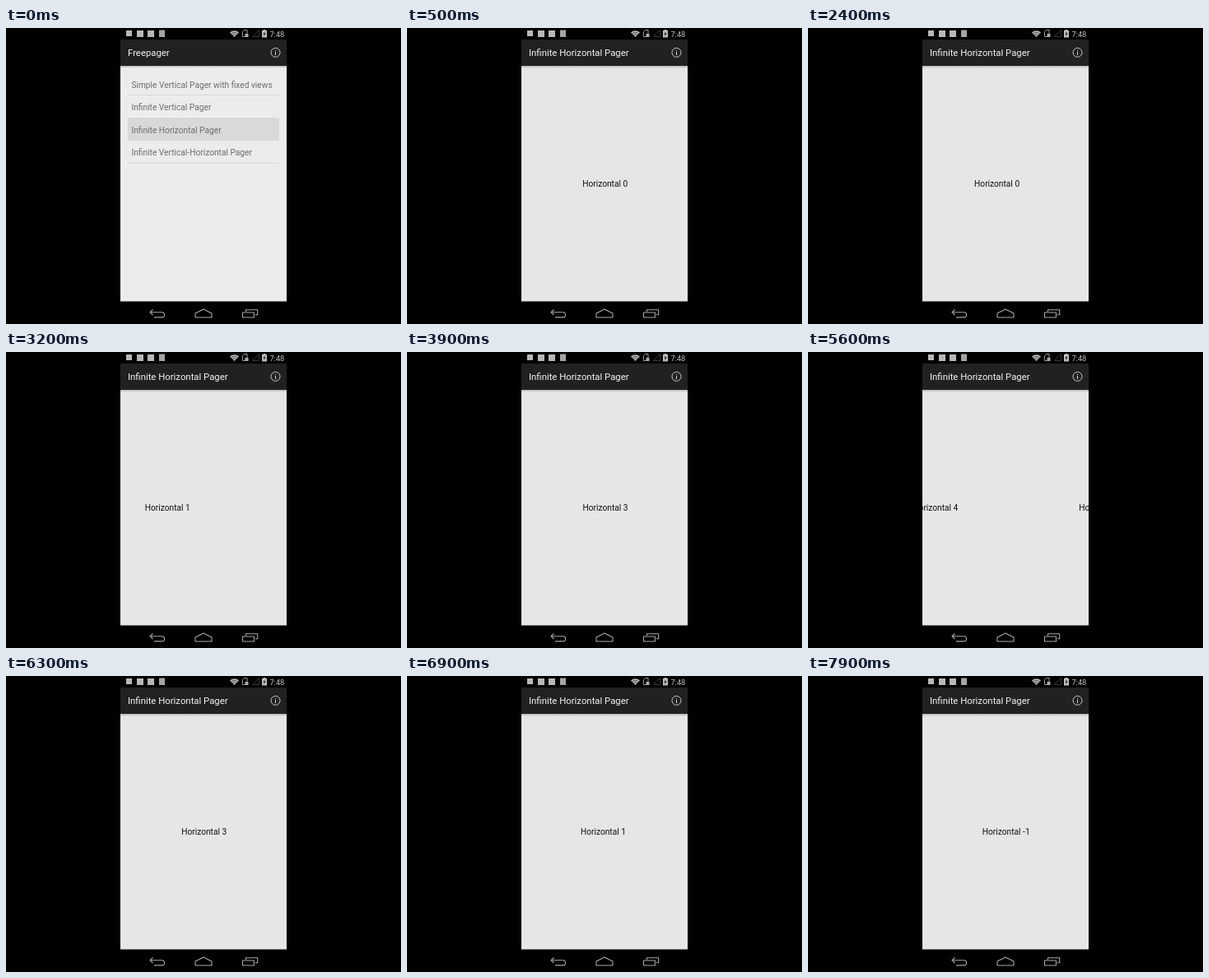
These frames come from a looping animation (480x360 px, 8 s). An HTML page with a canvas:

```html
<!DOCTYPE html>
<html lang="en">
<head>
<meta charset="utf-8">
<title>Freepager</title>
<style>
html, body { margin: 0; width: 100%; height: 100%; overflow: hidden; background: #000; }
canvas { display: block; width: 480px; height: 360px; }
</style>
</head>
<body>
<canvas id="stage" width="480" height="360"></canvas>
<script>
const ctx = document.getElementById('stage').getContext('2d');
const LOOP = 8000, STEP = 100;
const LEFT = 139, WIDTH = 202, MID = 240.7;
const TOP = 46, BOTTOM = 332.5;

// A swipe drags the page a little, then it settles with a quintic ease-out
const DRAG = .22, SETTLE = 280;
const swipe = (touch, release, dir) => ({ touch, release, dir });
const SWIPES = [
  swipe(2300, 2700, 1), swipe(3110, 3200, 1), swipe(3620, 3700, 1),
  swipe(4010, 4210, 1), swipe(4510, 4769, 1),
  swipe(5310, 5568, -1), swipe(5870, 6020, -1), swipe(6300, 6400, -1),
  swipe(6640, 6740, -1), swipe(7030, 7194, -1), swipe(7560, 7630, -1)
];

const clamp = v => Math.min(1, Math.max(0, v));

function progress(s, t) {
  if (t < s.release) return DRAG * clamp((t - s.touch) / (s.release - s.touch));
  return 1 - (1 - DRAG) * (1 - clamp((t - s.release) / SETTLE)) ** 5;
}

const pageAt = t => SWIPES.reduce((page, s) => page + s.dir * progress(s, t), 0);

function rect(x, y, w, h, color) {
  ctx.fillStyle = color;
  ctx.fillRect(x, y, w, h);
}

function text(str, x, y, size, color, align = 'left') {
  ctx.font = size + 'px Roboto, "Noto Sans", sans-serif';
  ctx.textAlign = align;
  ctx.fillStyle = color;
  ctx.fillText(str, x, y);
}

function trace(points, close) {
  ctx.beginPath();
  for (let i = 0; i < points.length; i += 2) ctx.lineTo(points[i], points[i + 1]);
  if (close) ctx.closePath();
}

function stroke(color, width) {
  ctx.strokeStyle = color;
  ctx.lineWidth = width;
  ctx.stroke();
}

function line(points, color, width = 1, close = false) {
  trace(points, close);
  stroke(color, width);
}

function fill(points, color) {
  trace(points, true);
  ctx.fillStyle = color;
  ctx.fill();
}

function wifi(x, y, color) {
  const fan = r => {
    ctx.beginPath();
    ctx.arc(x, y, r, -Math.PI * .75, -Math.PI * .25);
  };
  fan(7.8);
  ctx.lineTo(x, y);
  ctx.fillStyle = color;
  ctx.fill();
  for (const r of [3.2, 5.6]) {
    fan(r);
    stroke('#222', .7);
  }
}

function statusBar() {
  const gray = '#b8b8b8';
  rect(146, 3, 7, 7, gray);
  rect(159, 3, 8, 8, gray);
  rect(172, 3, 8, 8, gray);
  rect(186, 2.5, 7, 8.5, '#a4a4a4');
  wifi(277.5, 11, gray);
  line([287.5, 4.5, 289.5, 2.5, 293, 2.5, 293, 10.5, 287.5, 10.5], '#999', 1, true);
  rect(290.5, 7, 4, 4, '#aaa');
  line([299.5, 10.5, 307.5, 10.5, 307.5, 2.5], '#484848', .8, true);
  rect(311, 3, 6, 8.5, '#c0c0c0');
  rect(312.7, 2, 2.6, 1, '#c0c0c0');
  fill([314.7, 4, 312.2, 7.6, 313.8, 7.6, 313.3, 10.4, 315.8, 6.6, 314.2, 6.6], '#222');
  text('7:48', 320.4, 10.8, 9.3, '#c4c4c4');
}

function navBar() {
  const gray = '#a8a8a8';
  ctx.lineJoin = 'round';
  line([178.5, 342.5, 175, 345.7, 178.5, 349], gray, 1.1);
  ctx.beginPath();
  ctx.moveTo(175, 345.7);
  ctx.arc(189.5, 348.8, 3.1, -Math.PI / 2, Math.PI / 2);
  ctx.lineTo(180, 351.9);
  stroke(gray, 1.1);
  line([240, 342, 250, 347, 250, 352, 230, 352, 230, 347], gray, 1.1, true);
  line([287.5, 346, 301.5, 346, 301.5, 352, 287.5, 352], gray, 1.1, true);
  line([291.5, 345, 291.5, 342.7, 305.7, 342.7, 305.7, 348.7, 303, 348.7], gray, 1.1);
  ctx.lineJoin = 'miter';
}

function actionBar(title) {
  rect(LEFT, 14, WIDTH, TOP - 14, '#212121');
  const shadow = ctx.createLinearGradient(0, TOP - 1, 0, TOP + 3);
  shadow.addColorStop(0, 'rgba(70, 50, 62, .6)');
  shadow.addColorStop(1, 'rgba(190, 160, 178, 0)');
  rect(LEFT, TOP, WIDTH, 3, shadow);
  text(title, 148, 34, 11.35, '#f4f4f4');
  ctx.beginPath();
  ctx.arc(327.5, 29.8, 5.5, 0, Math.PI * 2);
  stroke('#d8d8d8', .9);
  rect(327, 29, 1, 4, '#d8d8d8');
  rect(327, 26.8, 1, 1.1, '#d8d8d8');
}

function menu() {
  const items = ['Simple Vertical Pager with fixed views', 'Infinite Vertical Pager',
    'Infinite Horizontal Pager', 'Infinite Vertical-Horizontal Pager'];
  rect(LEFT, TOP, WIDTH, BOTTOM - TOP, '#ececec');
  actionBar('Freepager');
  rect(148, 109, 184, 28, '#d9d9d9');
  items.forEach((item, i) => {
    const y = 72.8 + i * 27.5;
    text(item, 152.4, y, 10.2, '#6c6c6c');
    rect(148, Math.floor(y + 9), 184, 1, '#d9d9d9');
  });
}

function pager(page) {
  rect(LEFT, TOP, WIDTH, BOTTOM - TOP, '#e6e6e6');
  actionBar('Infinite Horizontal Pager');
  ctx.save();
  ctx.beginPath();
  ctx.rect(LEFT, TOP, WIDTH, BOTTOM - TOP);
  ctx.clip();
  const first = Math.floor(page);
  for (const n of [first, first + 1]) {
    text('Horizontal ' + n, MID + (n - page) * WIDTH, 193.2, 10.2, '#101010', 'center');
  }
  ctx.restore();
}

function draw(t) {
  rect(0, 0, 480, 360, '#000');
  statusBar();
  navBar();
  if (t < 500) menu();
  if (t >= 400) {
    ctx.globalAlpha = t < 500 ? .6 : 1;
    pager(pageAt(t));
    ctx.globalAlpha = 1;
  }
}

const begin = performance.now();
function tick() {
  const t = (performance.now() - begin) % LOOP;
  draw(Math.floor(t / STEP) * STEP);
  requestAnimationFrame(tick);
}
tick();
</script>
</body>
</html>
```
